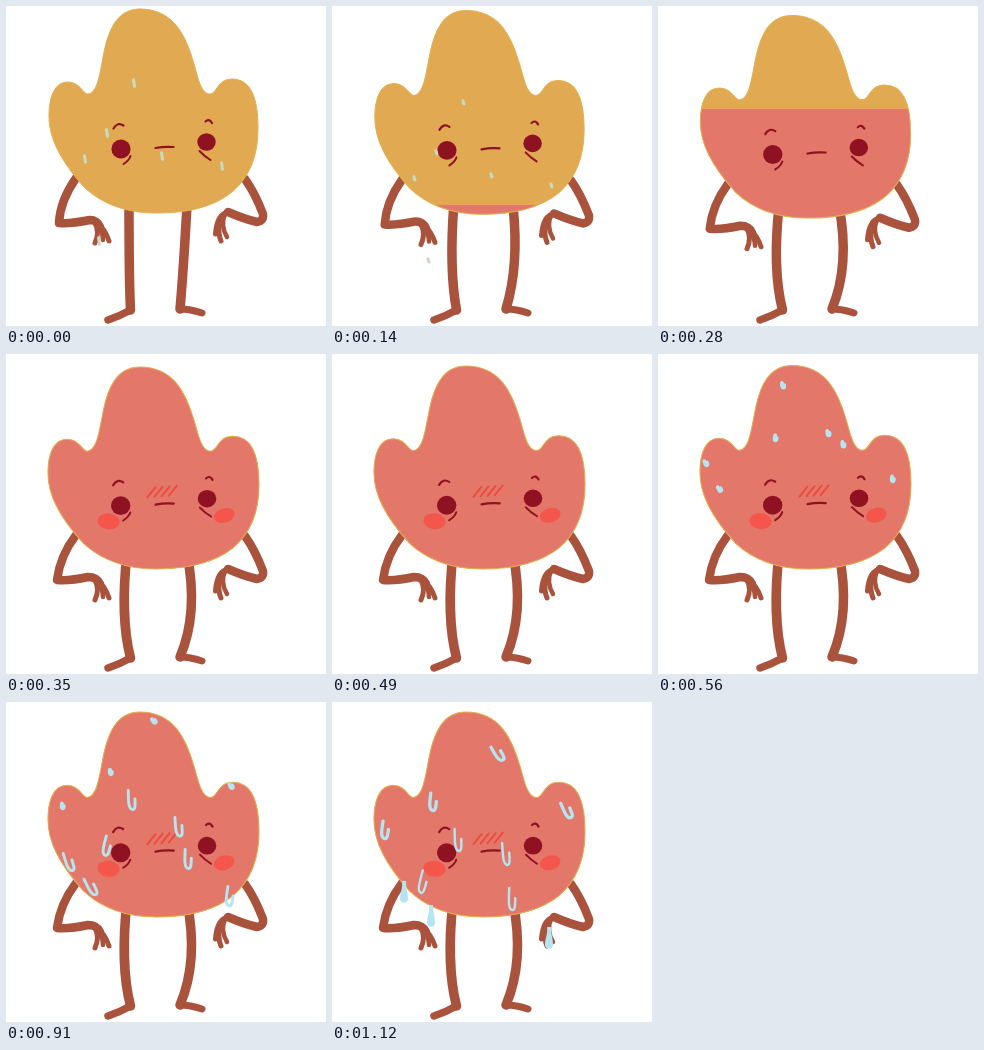
These frames come from a looping animation (320x320 px, 1190 ms). An HTML page with a canvas:

```html
<!DOCTYPE html>
<html lang="en">
<head>
<meta charset="utf-8">
<title>Flushed and sweating</title>
<style>
  html, body { margin: 0; width: 100%; height: 100%; overflow: hidden; background: #fff; }
  canvas { display: block; width: 320px; height: 320px; }
</style>
</head>
<body>
<canvas id="stage"></canvas>
<script>
const STEP = 70, COUNT = 17, FLUSHED = 5;
const ORANGE = '#e2a953', RED = '#e37769', LIMB = '#a9523c', DARK = '#8f1222',
      BLUSH = '#f4564c', WATER = '#b6e5f2', PALE = '#c6dcc2';

const canvas = document.getElementById('stage');
const ctx = canvas.getContext('2d');
const ratio = window.devicePixelRatio || 1;
canvas.width = canvas.height = 320 * ratio;

const bodyPath = new Path2D(
  'M134 3C112 3 103 22 98 46C94 66 92 87 82 88C77 88 74 76 62 76C48 76 43 92 43 110' +
  'C43 132 54 154 78 181C97 199 122 207 150 207C180 207 206 202 226 186' +
  'C246 169 252 146 252 122C252 92 245 73 226 73C211 73 211 88 204 88' +
  'C195 88 192 72 188 58C180 30 168 3 134 3Z');

// Each sweat wave starts at one step; its drops slide from one point to another.
const waves = [
  { birth: 7, runs: ['125,18 126,138', '121,72 91,180', '170,70 174,152', '186,77 180,197',
                     '45,99 72,190', '57,125 99,214', '237,111 217,236'] },
  { birth: 12, runs: ['142,8 166,51', '106,60 101,100', '222,76 235,108', '58,96 53,128'] }
];
const drops = waves.flatMap(({ birth, runs }) =>
  runs.map(run => ({ birth, points: run.split(/[ ,]/).map(Number) })));

const leftovers = ['128,77', '101,127', '79,153', '156,150', '216,160', '93,235']
  .map(p => p.split(',').map(Number));

const mix = (a, b, k) => a + (b - a) * k;

function line(d, color, width) {
  ctx.strokeStyle = color;
  ctx.lineWidth = width;
  ctx.stroke(new Path2D(d));
}

function ellipse(x, y, rx, ry, tilt, color) {
  ctx.fillStyle = color;
  ctx.beginPath();
  ctx.ellipse(x, y, rx, ry, tilt, 0, Math.PI * 2);
  ctx.fill();
}

function legs(bend) {
  const d = (a, b) => mix(a, b, bend);
  line(`M${d(123, 121)} 200C${d(123, 117)} 235 ${d(123, 117)} 275 124.5 304`, LIMB, 9.5);
  line('M124.5 304Q114 310 102 314', LIMB, 7.5);
  line(`M${d(181, 181)} 200C${d(179, 188)} 235 ${d(177, 188)} 270 174 303`, LIMB, 9.5);
  line('M174 303Q184 303 196 307', LIMB, 7);
}

function arms(squat) {
  const d = (a, b) => mix(a, b, squat);
  ctx.save();
  ctx.translate(0, 9 * squat);
  line(`M70 172Q54 ${d(195, 193)} ${d(53, 51)} 217Q64 218 ${d(84, 82)} 214Q91 214 94 221`, LIMB, 8.5);
  line('M89 217Q94 226 89 237', LIMB, 5);
  line('M91 218Q97 226 97 234', LIMB, 4.5);
  line('M92 218Q99 223 103 235', LIMB, 5);
  line('M239 173Q249 187 257 208Q258 215 251 216Q238 213 222 206', LIMB, 8.5);
  line('M222 206Q211 208 209.5 228', LIMB, 5);
  line('M220 207Q209 220 215 235', LIMB, 5);
  line('M219 208Q214 219 221 231', LIMB, 4.5);
  ctx.restore();
}

function face(flushed) {
  if (flushed) {
    ellipse(103, 159, 11, 8, .1, BLUSH);
    ellipse(217.5, 153, 10.5, 7.2, -.3, BLUSH);
    for (let i = 0; i < 4; i++) {
      const x = 141.5 + i * 7, y = 134.5 - i * .5;
      line(`M${x} ${y}L${x + 8} ${y - 10}`, '#ee4a40', 1.9);
    }
  }
  ellipse(115, 143, 9.6, 9.5, 0, DARK);
  ellipse(200.5, 136, 9.2, 8.8, 0, DARK);
  line('M107.5 122.5Q111.5 115.5 117.5 119.5', DARK, 2.2);
  line('M199.5 115.5Q203 112 206 117', DARK, 2.2);
  line('M124.5 150Q123 154.5 117.5 158', DARK, 2);
  line('M193.5 145Q198 150 204.5 154', DARK, 2);
  line('M149.5 142Q158 140.3 167.5 141', DARK, 2.2);
}

function body(f, squat) {
  const top = f <= FLUSHED ? 10 * squat : Math.max(7, 10 - (f - FLUSHED) / 2);
  const level = 215 - 50 * (f / 3) ** 2.8;

  ctx.save();
  ctx.beginPath();
  ctx.rect(0, level, 320, 320);
  const redArea = new Path2D();
  redArea.rect(0, level, 320, 320 + Math.abs(level));
  const place = () => {
    ctx.translate(148, 3 + top);
    ctx.scale(1 + .01 * squat, (204 + 8 * squat - top) / 204);
    ctx.translate(-148, -3);
  };
  const paint = color => {
    ctx.save();
    place();
    ctx.fillStyle = color;
    ctx.fill(bodyPath);
    ctx.restore();
  };
  paint(ORANGE);
  ctx.clip(redArea);
  paint(RED);
  ctx.restore();

  ctx.save();
  place();
  line(bodyPath, '#e5b04f', 1);
  face(f >= FLUSHED);
  ctx.restore();
}

function drop({ birth, points: [x0, y0, x1, y1] }, f) {
  const age = f - birth;
  if (age <= 0) return;
  const k = age / (COUNT - 1 - birth), size = Math.min(1, age / 3);
  const x = mix(x0, x1, k), y = mix(y0, y1, k);
  const falling = size === 1 && !ctx.isPointInPath(bodyPath, x * ratio, (y - 8) * ratio);
  const w = 3.3 * size, h = (13 + age) / 2 * size;

  ctx.save();
  ctx.translate(x, y);
  if (falling) {
    ctx.fillStyle = WATER;
    ctx.fill(new Path2D(`M-2 ${-h}C-1 ${-h * .3} -4 0 -4 ${h - 4}` +
      `C-4 ${h + 1} 4 ${h + 1} 4 ${h - 4}C4 0 2 ${-h * .3} 2 ${-h}Z`));
  } else {
    // A long streak that hooks up into a shorter one.
    ctx.rotate(-Math.atan2(x1 - x0, y1 - y0));
    line(`M${-w} ${-h}C${-w} ${h * .2} ${-w} ${h} ${w * .3} ${h}` +
         `C${w * 1.2} ${h} ${w} ${h * .4} ${w} ${-h * .1}`, WATER, 4 - age * .18);
  }
  ctx.restore();
}

function leftover([x, y], f) {
  const half = 3.2 * (1 - f / 4), cx = x + 1.7 * f, cy = y + 9.7 * f;
  line(`M${cx - .5} ${cy - half}L${cx + .5} ${cy + half}`, PALE, 3);
}

function draw(f) {
  ctx.setTransform(ratio, 0, 0, ratio, 0, 0);
  ctx.fillStyle = '#fff';
  ctx.fillRect(0, 0, 320, 320);
  ctx.lineCap = ctx.lineJoin = 'round';
  const rise = Math.min(1, f / FLUSHED), squat = rise ** 2;
  legs(1 - (1 - rise) ** 2);
  arms(squat);
  body(f, squat);
  drops.forEach(d => drop(d, f));
  if (f < 3) leftovers.forEach(p => leftover(p, f));
}

const start = performance.now();
function tick() {
  draw(Math.floor((performance.now() - start) / STEP) % COUNT);
  requestAnimationFrame(tick);
}
tick();
</script>
</body>
</html>
```
